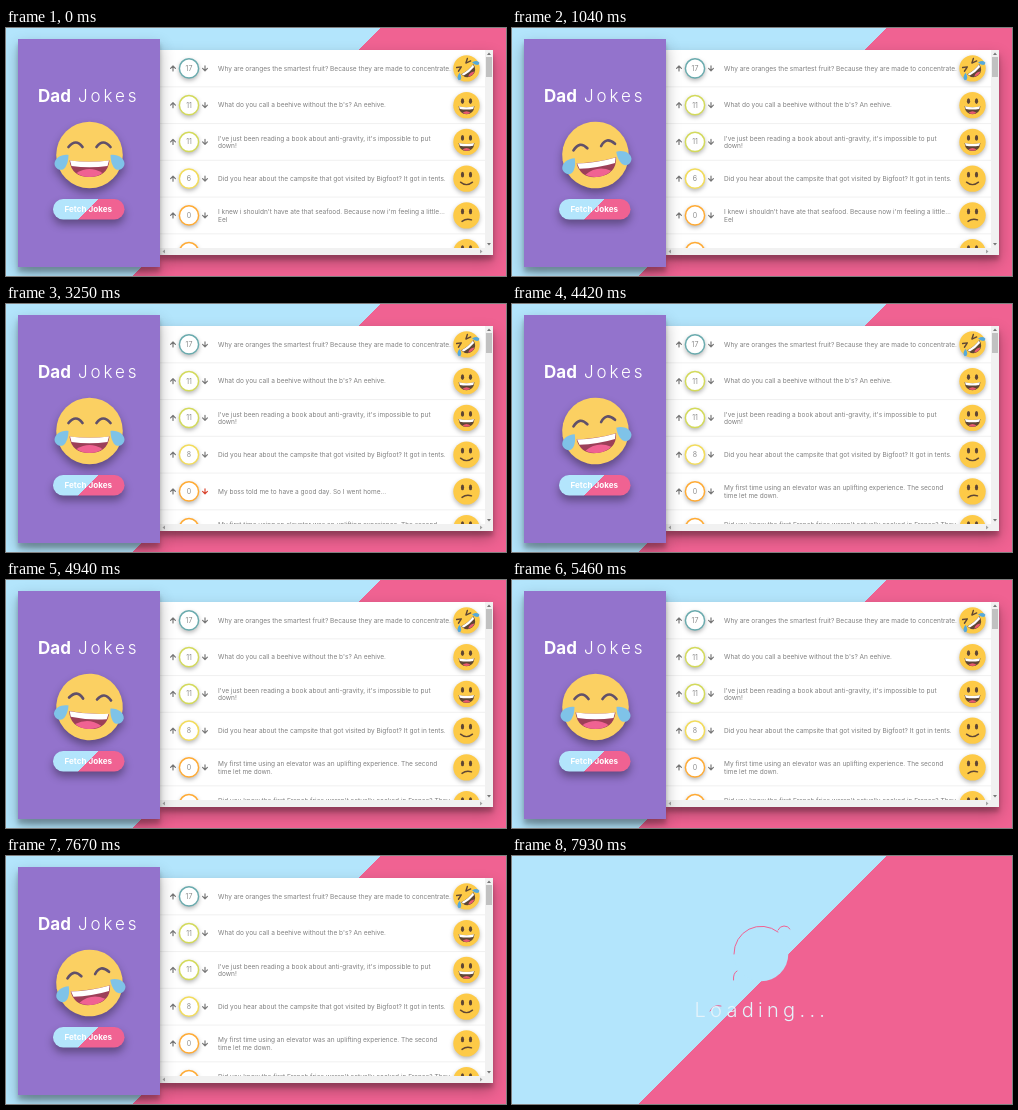
An HTML page that plays this animation: 500 by 248 pixels, repeating every 8 s.

```html
<!DOCTYPE html>
<html lang="en">
<head>
<meta charset="utf-8">
<title>Dad Jokes</title>
<style>
html, body { margin: 0; width: 100%; height: 100%; overflow: hidden; }
#stage {
  position: relative; width: 500px; height: 248px; overflow: hidden;
  background: linear-gradient(135deg, #b3e5fc 50%, #f06292 50%);
  background-size: 500px 248px;
}
.panel {
  position: absolute;
  box-shadow: 0 7px 14px rgba(0,0,0,.3), 0 5px 4px rgba(0,0,0,.2);
}
#list { left: 154px; top: 22px; width: 333px; height: 205px; background: #fff; }
#side { left: 12px; top: 11px; width: 142px; height: 228px; background: #9373cc; }
svg { position: absolute; left: 0; top: 0; display: block; }
text { font-family: Inter, Roboto, sans-serif; }
.joke { font-size: 6.53px; fill: #808080; }
.votes { font-size: 7px; fill: #8c8c8c; text-anchor: middle; }
.lift { filter: drop-shadow(0 2px 2px rgba(0,0,0,.28)); }
.bigLift { filter: drop-shadow(0 5px 4px rgba(0,0,0,.36)); }
.line { fill: none; stroke-linecap: round; stroke-linejoin: round; }
</style>
</head>
<body>
<div id="stage">
  <div id="app">
    <div id="list" class="panel"></div>
    <svg width="500" height="248" viewBox="0 0 500 248">
      <clipPath id="view"><rect x="154" y="22" width="325" height="198"/></clipPath>
      <g id="rows" clip-path="url(#view)"></g>
      <rect x="479" y="22" width="8" height="198" fill="#f1f1f1"/>
      <rect x="154" y="220" width="333" height="7" fill="#f1f1f1"/>
      <rect x="480" y="29" width="6" height="20" fill="#c1c1c1"/>
      <path d="M481 27l2-2.5 2 2.5zM481 215l2 2.5 2-2.5z" fill="#777"/>
      <path d="M159 221.5l-2.5 2 2.5 2zM474 221.5l2.5 2-2.5 2z" fill="#a3a3a3"/>
    </svg>
    <div id="side" class="panel"></div>
    <svg width="500" height="248" viewBox="0 0 500 248">
      <defs>
        <linearGradient id="split" gradientUnits="userSpaceOnUse" x1="73" y1="171" x2="93" y2="191">
          <stop offset=".5" stop-color="#b3e5fc"/><stop offset=".5" stop-color="#f06292"/>
        </linearGradient>
      </defs>
      <text x="32" y="74" font-size="17" font-weight="700" fill="#fff">Dad</text>
      <text x="72" y="74" font-size="17" font-weight="300" letter-spacing="2.9" fill="#fff">Jokes</text>
      <g class="bigLift">
        <g id="face">
          <circle r="33.3" fill="#fbd062"/>
          <path class="line" d="M-21-8q7.500-9 14 0M7-8q6.500-9 14 0" stroke="#60506a" stroke-width="2.700"/>
          <path d="M-20 5.500Q0 8 20 5.500Q18 22 0 22Q-18 22-20 5.500Z" fill="#9c3f58"/>
          <path d="M-19.500 5.500Q0 8 19.500 5.500L18 11Q0 13.500-18 11Z" fill="#fff"/>
          <path d="M-13 18Q0 10 13 18Q8 22 0 22Q-8 22-13 18Z" fill="#f06292"/>
          <path id="tear" d="M-21 0C-28-1-35 3-35 9C-34 15-27 17-24 12Q-21 7-21 0Z" fill="#7fc3e8"/>
          <use href="#tear" transform="scale(-1 1)"/>
        </g>
      </g>
      <g class="bigLift"><rect x="47" y="171" width="71.500" height="20.500" rx="10.250" fill="url(#split)"/></g>
      <text x="58.500" y="184.200" font-size="8.100" font-weight="700" fill="#fff">Fetch Jokes</text>
    </svg>
  </div>
  <svg id="loading" width="500" height="248" viewBox="0 0 500 248">
    <circle cx="249" cy="98" r="27.300" fill="#b3e5fc"/>
    <path class="line" d="M222 98A27.300 27.300 0 0 1 266 76M266 74Q268 70 272 70Q276 70 278 73M221.500 124Q221 117 225 115M198 155Q202 148 209 150" stroke="#f06292" stroke-width="1"/>
    <text x="182.500" y="161" font-size="20" font-weight="300" letter-spacing="4.300" fill="#e4f3fb">Loading...</text>
  </svg>
</div>
<script>
const LOOP = 8000, STEP = 130;
const FIRST_ROW = 40.4, PITCH = 36.75;
const $ = id => document.getElementById(id);

const brown = '#5f4634';
const eyes = `<ellipse cx="-4" cy="-4" rx="1.600" ry="2.900" fill="${brown}"/><ellipse cx="4" cy="-4" rx="1.600" ry="2.900" fill="${brown}"/>`;
const curve = d => `<path class="line" d="${d}" stroke="${brown}" stroke-width="1.400"/>`;
const openMouth = `<path d="M-8 1Q0 3 8 1Q7 9 0 9Q-7 9-8 1Z" fill="${brown}"/>
  <path d="M-7.500 1.200Q0 3 7.500 1.200L6.700 3.800Q0 5-6.700 3.800Z" fill="#fff"/>
  <path d="M-4 7.500Q0 4.500 4 7.500Q0 10-4 7.500Z" fill="#e8596e"/>`;
const drop = 'M-8-1Q-14 0-13.500 4Q-10 7-8-1Z';
const moods = {
  rofl: `<g transform="rotate(-40)">${curve('M-8-3L-3-4.500L-7-7M8-3L3-4.500L7-7')}${openMouth}
    <path d="${drop}" fill="#55a9dc"/><path d="${drop}" transform="scale(-1 1)" fill="#55a9dc"/></g>`,
  grin: eyes + openMouth,
  smile: eyes + curve('M-6 3.500Q0 8.500 6 3.500'),
  unsure: eyes + curve('M-4.500 6Q0 2.500 5 4.500')
};

const jokes = {
  fruit: ['Why are oranges the smartest fruit? Because they are made to concentrate.'],
  bees: ["What do you call a beehive without the b's? An eehive."],
  gravity: ["I've just been reading a book about anti-gravity, it's impossible to put", 'down!'],
  camp: ['Did you hear about the campsite that got visited by Bigfoot? It got in tents.'],
  eel: ["I knew i shouldn't have ate that seafood. Because now i'm feeling a little…", 'Eel'],
  boss: ['My boss told me to have a good day. So I went home...'],
  lift: ['My first time using an elevator was an uplifting experience. The second', 'time let me down.'],
  fries: ["Did you know the first French fries weren't actually cooked in France? They", 'were cooked in Greece.']
};

const rows = [
  [17, '#6aabae', 'rofl', 'fruit'],
  [11, '#d3da5b', 'grin', 'bees'],
  [11, '#d3da5b', 'grin', 'gravity'],
  [6, '#f2dc5c', 'smile', 'camp'],
  [0, '#ffab35', 'unsure', 'eel'],
  [0, '#ffab35', 'unsure', 'boss']
];

const jokeText = key => {
  const lines = jokes[key];
  const top = lines.length > 1 ? -1.4 : 2.3;
  return lines.map((s, i) => `<text class="joke" x="212" y="${top + i * 7.8}">${s}</text>`).join('');
};
const arrow = (x, turn, id) =>
  `<path id="${id}" class="line" transform="translate(${x} 0) rotate(${turn})" d="M0 2.500V-2.200M-2.400 0L0-2.400L2.400 0" stroke="#777" stroke-width="1.200"/>`;

$('rows').innerHTML = rows.map(([votes, ring, mood, joke], i) => `
  <g transform="translate(0 ${FIRST_ROW + PITCH * i})">
    <path d="M154 18.400H479" stroke="#ededed" stroke-width=".8"/>
    ${arrow(167, 0, 'up' + i)}${arrow(199, 180, 'down' + i)}
    <circle class="lift" cx="183" r="9.600" fill="#fff" stroke="${ring}" stroke-width="1.500"/>
    <text id="votes${i}" class="votes" x="183" y="2.500">${votes}</text>
    <g id="joke${i}">${jokeText(joke)}</g>
    <g class="lift" transform="translate(460.500 0)"><circle r="13.200" fill="#fdca47"/>${moods[mood]}</g>
  </g>`).join('');

// each track: [start time, value]
const voteTrack = [[0, 6], [1300, 7], [1820, 8]];
const topTrack = [[0, 'eel'], [2470, 'boss'], [3900, 'lift']];
const nextTrack = [[0, 'boss'], [2470, 'lift'], [3900, 'fries']];
const hoverTrack = [[0, '#777'], [2340, '#d9452f'], [4290, '#777']];
const wobbleStarts = [910, 2990, 4290, 5720, 7540];
const wobble = [-5, -9, 0, 8, 9, 4, 0];
const LOADING_AT = 7930;

const at = (track, t) => track.filter(([start]) => start <= t).pop()[1];
const tilt = t => {
  const start = wobbleStarts.filter(s => s <= t).pop();
  return start === undefined ? 0 : wobble[Math.floor((t - start) / STEP)] || 0;
};

const shown = {};
function setJoke(id, key) {
  if (shown[id] === key) return;
  shown[id] = key;
  $(id).innerHTML = jokeText(key);
}

function draw(t) {
  const loading = t >= LOADING_AT;
  $('app').style.visibility = loading ? 'hidden' : 'visible';
  $('loading').style.visibility = loading ? 'visible' : 'hidden';
  $('votes3').textContent = at(voteTrack, t);
  setJoke('joke4', at(topTrack, t));
  setJoke('joke5', at(nextTrack, t));
  $('down4').setAttribute('stroke', at(hoverTrack, t));
  $('face').setAttribute('transform', `translate(83.500 127) rotate(${tilt(t)})`);
}

const begin = performance.now();
function tick() {
  draw((performance.now() - begin) % LOOP);
  requestAnimationFrame(tick);
}
tick();
</script>
</body>
</html>
```
